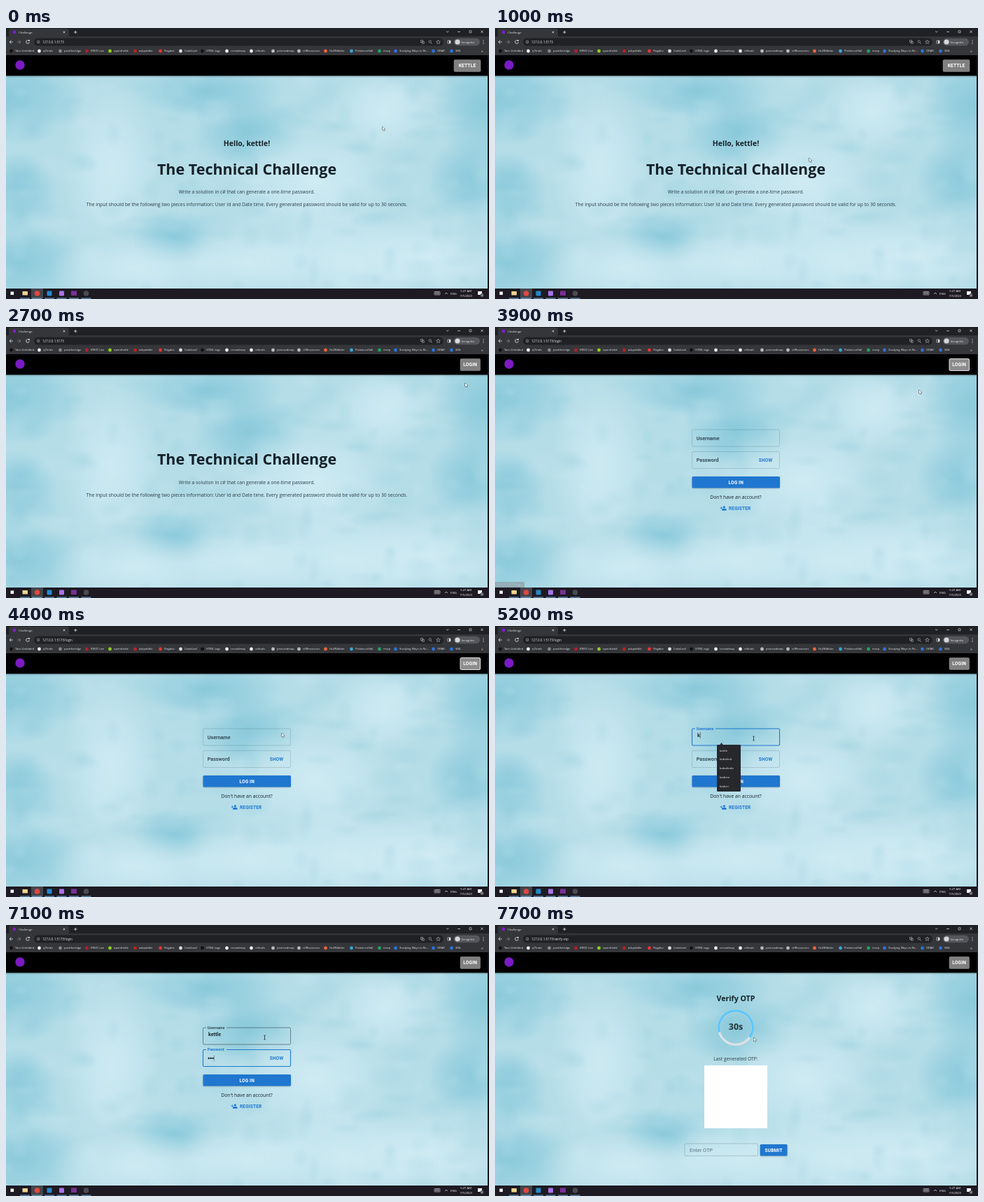
An HTML page with a canvas for the animation above (8 s loop, 690 by 388 pixels).

```html
<!DOCTYPE html>
<html lang="en">
<head>
<meta charset="utf-8">
<title>Challenge</title>
<style>
html, body { margin: 0; width: 100%; height: 100%; overflow: hidden; background: #000; }
canvas { display: block; width: 690px; height: 388px; }
</style>
</head>
<body>
<canvas id="stage" width="690" height="388"></canvas>
<script>
const W = 690, H = 388, LOOP = 8000, USER = 'kettle';
const BLUE = '#1f77cf', INK = '#15222a', SANS = '"Open Sans", sans-serif', ROBOTO = 'Roboto, sans-serif';
const g = document.getElementById('stage').getContext('2d');
let c = g;

const clamp = v => Math.max(0, Math.min(1, v));
const mix = (a, b, p) => a + (b - a) * p;
const ease = p => p * p * (3 - 2 * p);

function rect(x, y, w, h, fill, r = 0) {
  c.fillStyle = fill;
  c.beginPath();
  c.roundRect(x, y, w, h, r);
  c.fill();
}
function frame(x, y, w, h, color, r = 0, width = 0.6) {
  c.strokeStyle = color;
  c.lineWidth = width;
  c.beginPath();
  c.roundRect(x, y, w, h, r);
  c.stroke();
}
function dot(x, y, r, fill) {
  c.fillStyle = fill;
  c.beginPath();
  c.arc(x, y, r, 0, 7);
  c.fill();
}
function line(color, width, ...pts) {
  c.strokeStyle = color;
  c.lineWidth = width;
  c.beginPath();
  for (let i = 0; i < pts.length; i += 2) c.lineTo(pts[i], pts[i + 1]);
  c.stroke();
}
// y is the middle of the capital letters
function text(s, x, y, size, color = INK, weight = 400, align = 'left', family = SANS, spacing = 0) {
  c.font = `${weight} ${size}px ${family}`;
  c.letterSpacing = spacing + 'px';
  c.textAlign = align;
  c.fillStyle = color;
  c.fillText(s, x, y + size * 0.357);
  c.letterSpacing = '0px';
}
const centred = (s, y, size, weight, color) => text(s, 344, y, size, color, weight, 'center');
const caps = (s, x, y, color = '#fff', size = 6.5, align = 'center') =>
  text(s, x, y, size, color, 700, align, ROBOTO, 0.18);

function layer(draw) {
  const canvas = document.createElement('canvas');
  canvas.width = W;
  canvas.height = H;
  c = canvas.getContext('2d');
  draw();
  c = g;
  return canvas;
}

function blob(x, y, rx, ry, rgb, alpha) {
  c.save();
  c.translate(x, y);
  c.scale(rx, ry);
  const fill = c.createRadialGradient(0, 0, 0, 0, 0, 1);
  fill.addColorStop(0, `rgba(${rgb},${alpha})`);
  fill.addColorStop(0.5, `rgba(${rgb},${alpha * 0.6})`);
  fill.addColorStop(1, `rgba(${rgb},0)`);
  c.fillStyle = fill;
  c.fillRect(-1, -1, 2, 2);
  c.restore();
}

function drawSky() {
  const deep = '122,194,213', pale = '214,238,245';
  rect(0, 68, W, 305, '#b5dde8');
  for (const [x, y, rx, ry] of [[5, 100, 110, 70], [290, 90, 110, 40], [685, 110, 75, 85], [20, 335, 95, 60],
    [15, 235, 60, 60], [665, 215, 65, 60], [345, 150, 80, 55], [240, 300, 60, 40]])
    blob(x, y, rx, ry, deep, 0.7);
  for (const [x, y, rx, ry] of [[150, 200, 70, 120], [190, 345, 130, 50], [480, 330, 140, 70], [600, 330, 110, 65],
    [440, 220, 120, 80], [345, 335, 100, 55], [540, 120, 80, 60]])
    blob(x, y, rx, ry, pale, 0.75);
  let seed = 7;
  const rnd = () => (seed = seed * 16807 % 2147483647) / 2147483647;
  for (let i = 0; i < 220; i++)
    blob(rnd() * W, 68 + rnd() * 305, 10 + rnd() * 24, 7 + rnd() * 18, rnd() < 0.45 ? deep : pale, 0.13);
}

const bookmarks = [
  [7, 'Tarn Unfolded', '#111'], [47, 'q7trials', '#eee'], [77, 'pasttheridge', '#888'], [115, 'KRVD Live', '#b3202b'],
  [148, 'openthelid', '#8bd41f'], [184, 'askpebble', '#b22'], [220, 'Flagdex', '#e33'], [249, 'CodeLeaf', '#ddd'],
  [280, 'HTML tags', '#111'], [315, 'crroadmap', '#eee'], [350, 'ctftools', '#eee'], [381, 'penroadmap', '#bbb'],
  [418, 'ctfResources', '#bbb'], [456, 'HullNibbler', '#f0643c'], [493, 'ProberunHall', '#36a6d8'],
  [533, 'mvcp', '#1fa463'], [556, 'Studying Ways to Re...', '#2a73d9'], [610, 'ORAR', '#2a73d9'], [636, 'SML', '#2a73d9']
];

function drawBrowser() {
  const bar = '#35363a', light = '#e2e4e7';
  rect(0, 0, W, 39, bar);
  rect(0, 0, W, 12, '#202124');
  rect(4, 1, 86, 13, bar, 3);
  dot(12, 6, 2.4, '#7b1fc9');
  text('Challenge', 18, 6, 4.3, light);
  const cross = (x, y, r) => {
    line(light, 0.7, x - r, y - r, x + r, y + r);
    line(light, 0.7, x + r, y - r, x - r, y + r);
  };
  cross(83, 6, 1.4);
  line(light, 0.8, 97, 6, 101.5, 6);
  line(light, 0.8, 99.25, 3.8, 99.25, 8.2);
  line(light, 0.7, 629, 4.5, 630.7, 6, 632.4, 4.5);
  line(light, 0.7, 645, 5.5, 649, 5.5);
  frame(662, 3.8, 3, 3, light);
  cross(680, 5.3, 1.7);

  line(light, 0.8, 7.5, 17.5, 5, 20, 7.5, 22.5);
  line(light, 0.8, 5, 20, 10, 20);
  line('#85878b', 0.8, 18.5, 17.5, 21, 20, 18.5, 22.5);
  line('#85878b', 0.8, 16, 20, 21, 20);
  c.beginPath();
  c.arc(31, 20, 2.3, 0, 5.2);
  c.strokeStyle = light;
  c.stroke();
  rect(32, 17, 1.8, 1.8, light);
  rect(40, 14.5, 585, 11, '#202124', 5.5);
  frame(44.5, 18, 3.4, 3.8, '#bbb', 1.7);
  line('#bbb', 0.6, 46.2, 19.5, 46.2, 21);
  frame(592.5, 17.5, 3, 3, '#bbb');
  frame(594.3, 19.3, 3, 3, '#bbb');
  frame(604, 17.7, 3.4, 3.4, '#bbb', 1.7);
  line('#bbb', 0.7, 607, 21, 608.7, 22.7);
  line('#bbb', 0.6, 617.5, 17, 618.3, 19, 620.4, 19.2, 618.8, 20.5, 619.3, 22.6, 617.5, 21.5,
    615.7, 22.6, 616.2, 20.5, 614.6, 19.2, 616.7, 19, 617.5, 17);
  frame(631, 18, 4, 4, light);
  rect(633, 18, 2, 4, light);
  rect(640, 14.7, 37, 10.6, '#55575c', 5.3);
  dot(645, 20, 3.6, '#d5d7da');
  text('Incognito', 650.5, 20, 4.3, light);
  for (const y of [17.8, 20, 22.2]) dot(682, y, 0.6, light);
  for (const [x, name, color] of bookmarks) {
    dot(x + 0.5, 33, 2.4, color);
    text(name, x + 6, 33, 4.1, light);
  }
  text('»', 679, 33, 5.5, light);

  rect(0, 39, W, 29, '#000');
  dot(20, 53, 6.7, '#7a1bc4');
  rect(0, 68, W, 1, 'rgba(0,0,0,.55)');
  rect(0, 69, W, 1.5, 'rgba(0,0,0,.12)');
  rect(688, 39, 2, 334, '#15181b');
}

function drawTaskbar() {
  rect(0, 373, W, 15, '#1d1a23');
  rect(6.5, 377.5, 4.6, 4.6, '#fff');
  rect(36, 373, 17, 15, '#44454c');
  rect(23.5, 377, 7.5, 5.6, '#f2d68a', 0.6);
  dot(44.5, 380, 3.8, '#e0483c');
  rect(58.5, 376.5, 7, 7, '#2489ca', 1);
  rect(76, 376.5, 7, 7, '#a974e8', 1);
  rect(93, 376.5, 8, 6.6, '#7a2f94', 0.6);
  dot(114.5, 380, 3.8, '#4a4b50');
  for (const x of [20, 37, 55, 72.5, 90, 107.5]) rect(x, 386.6, 14, 1, '#79b8e8');
  frame(612, 377.5, 8, 4.5, '#ddd', 0.5);
  for (const y of [378.9, 380.3]) line('#ddd', 0.7, 613, y, 619, y);
  line('#eee', 0.7, 627, 381, 629, 379, 631, 381);
  text('ENG', 635, 380, 4.3, '#fff');
  text('5:27 AM', 665, 376.7, 4.2, '#fff', 400, 'right');
  text('7/5/2023', 666, 383.8, 4.2, '#fff', 400, 'right');
  rect(674, 377, 6, 5, '#fff');
  dot(680, 382.5, 2.6, '#55585d');
  text('2', 680, 382.5, 3.6, '#fff', 400, 'center');
}

const backdrop = layer(() => { drawSky(); drawBrowser(); drawTaskbar(); });

function headerButton(label, x, w, active) {
  rect(x, 45.5, w, 17, active ? '#8d8d8d' : '#808080', 1.5);
  frame(x, 45.5, w, 17, active ? '#e4e4e4' : '#969696', 1.5, active ? 1 : 0.5);
  caps(label, x + w / 2, 54, '#fff', 6.6);
}

function blueButton(label, x, y, w, h) {
  c.shadowColor = 'rgba(0,0,0,.25)';
  c.shadowBlur = 2;
  c.shadowOffsetY = 0.7;
  rect(x, y, w, h, BLUE, 1.5);
  c.shadowColor = 'transparent';
  caps(label, x + w / 2, y + h / 2);
}

// lift: 0 = label resting inside, 1 = label set into the top border
function field(label, y, lift, color, width) {
  c.save();
  if (lift > 0) {
    c.beginPath();
    c.rect(0, 0, W, H);
    c.rect(286, y - 2, 29 * lift, 4);
    c.clip('evenodd');
  }
  frame(281.5, y, 125, 24, color, 1.5, width);
  c.restore();
  text(label, 287.7, mix(y + 12, y, lift), mix(7.2, 5.4, lift), color === BLUE ? BLUE : '#36505c', 700, 'left', ROBOTO);
}

function home(user, y) {
  if (user) centred(`Hello, ${user}!`, 165, 10.4, 700);
  centred('The Technical Challenge', y, 21.5, 700);
  centred('Write a solution in c# that can generate a one-time password.', y + 33, 6.8, 400, '#2a3d45');
  centred('The input should be the following two pieces information: User Id and Date time. ' +
    'Every generated password should be valid for up to 30 seconds.', y + 51, 6.8, 400, '#2a3d45');
}

function suggestions(picked) {
  rect(317, 170, 34, 67, '#26282c', 1);
  c.beginPath();
  c.moveTo(321, 170.5);
  c.lineTo(323.5, 167);
  c.lineTo(326, 170.5);
  c.fill();
  if (picked) rect(317, 172, 34, 12, '#44474c');
  [USER, 'kobalind', 'kobalindo', 'kadoro', 'kadori'].forEach((name, i) =>
    text(name, 321, 178 + i * 12.9, 4.3, '#f1f1f1'));
}

const dotTimes = [6200, 6900, 7100, 7300, 7400];

function login(t) {
  const inName = t >= 4500 && t < 5800, inPass = t >= 5800;
  const plain = 'rgba(20,50,65,.28)';
  field('Username', 147, clamp((t - 4500) / 200), inName ? BLUE : inPass ? '#33454d' : plain, inName ? 1.1 : 0.6);
  field('Password', 178.5, clamp((t - 5800) / 220), inPass ? BLUE : plain, inPass ? 1.1 : 0.6);
  caps('SHOW', 386.5, 190.5, BLUE);
  const typed = t < 4900 ? '' : t < 5400 ? USER[0] : USER;
  text(typed, 289, 156.8, 7.1, '#1b2a31', 700, 'left', ROBOTO);
  if (inName) {
    const x = 289.5 + c.measureText(typed).width;
    line('#333', 0.6, x, 152, x, 161);
  }
  if (inPass) {
    const count = dotTimes.filter(at => t >= at).length;
    for (let i = 0; i < count; i++) dot(289.7 + i * 3, 190.8, 1.2, INK);
    const x = 288.3 + count * 3;
    line('#4a6b7c', 0.6, x, 186.5, x, 195);
  }
  blueButton('LOG IN', 281.5, 214, 125.5, 16.5);
  centred("Don't have an account?", 243.5, 6.8, 400);
  dot(327.3, 257.8, 1.6, BLUE);
  rect(324, 260, 6.6, 2.8, BLUE, [1.6, 1.6, 0, 0]);
  line(BLUE, 0.8, 321.6, 259, 325, 259);
  line(BLUE, 0.8, 323.3, 257.3, 323.3, 260.7);
  caps('REGISTER', 334, 259.7, BLUE, 6.5, 'left');
  if (t >= 4950 && t < 5600) suggestions(t >= 5400);
}

function verify() {
  centred('Verify OTP', 105.6, 10.6, 700);
  const arc = (from, to, color) => {
    c.strokeStyle = color;
    c.lineWidth = 3;
    c.beginPath();
    c.arc(344, 147, 24.3, from, to);
    c.stroke();
  };
  arc(0, 7, '#dfe3e6');
  arc(2.88, 6.89, '#5bc6fa');
  centred('30s', 145.7, 12.4, 700, '#22333b');
  centred('Last generated OTP:', 191.3, 6.8, 400, '#2a3d45');
  rect(299, 201, 90, 90, '#fff');
  frame(271, 313, 104.5, 17.5, 'rgba(20,50,65,.35)', 1.5);
  text('Enter OTP', 278, 322, 7.4, '#5c747e', 400, 'left', ROBOTO);
  blueButton('SUBMIT', 378.7, 314, 38.8, 16.5);
}

const path = [
  [0, 538, 141], [400, 440, 232], [700, 356, 243], [900, 366, 225], [1100, 532, 147], [1300, 532, 147],
  [1700, 648, 58], [1900, 651, 57], [2200, 657, 78], [2700, 656, 80], [3000, 662, 56], [3400, 662, 56],
  [3900, 606, 90], [4000, 606, 90], [4500, 369.5, 161]
];
function pointerAt(t) {
  const i = path.findIndex(p => p[0] > t);
  if (i < 0) return path[path.length - 1].slice(1);
  const [t0, x0, y0] = path[i - 1], [t1, x1, y1] = path[i];
  const p = ease((t - t0) / (t1 - t0));
  return [mix(x0, x1, p), mix(y0, y1, p)];
}

function pointer(t) {
  const [x, y] = pointerAt(t);
  c.save();
  c.translate(x, y);
  if (t >= 4500 && t < 7600) {
    line('#1b2a31', 0.8, 0, -2.8, 0, 2.8);
    for (const e of [-2.9, 2.9]) line('#1b2a31', 0.7, -1.3, e, 1.3, e);
  } else if ((t >= 1700 && t < 2300) || (t >= 3000 && t < 3500)) {
    frame(-0.7, 0, 1.5, 4, '#222', 0.7);
    frame(-1.6, 2.4, 4.6, 3.6, '#222', 1);
    rect(-0.7, 0, 1.5, 4, '#fff', 0.7);
    rect(-1.6, 2.4, 4.6, 3.6, '#fff', 1);
  } else {
    c.beginPath();
    for (const [px, py] of [[0, 0], [0, 5.2], [1.2, 4.2], [2.1, 6.1], [3, 5.7], [2.1, 3.8], [3.7, 3.8]]) c.lineTo(px, py);
    c.closePath();
    c.strokeStyle = '#222';
    c.lineWidth = 0.9;
    c.stroke();
    c.fillStyle = '#fff';
    c.fill();
  }
  c.restore();
}

function draw(t) {
  c.drawImage(backdrop, 0, 0);
  const route = t < 3300 ? '' : t < 7600 ? '/login' : '/verify-otp';
  text('127.0.0.1:5173' + route, 52, 20, 4.55, '#e8eaed');
  if (t < 2300) {
    headerButton(USER.toUpperCase(), 640, 38, t >= 1700);
    home(USER, 202);
    if (t >= 1800) {
      rect(636.5, 65.5, 44, 23.5, '#808080');
      frame(636.5, 65.5, 44, 23.5, '#202020', 0, 1.2);
      caps('LOGOUT', 658.5, 77, '#fff', 6.9);
    }
  } else {
    headerButton('LOGIN', 649, 28.5, t >= 3000 && t < 4500);
    if (t < 3300) home('', 189.5);
    else if (t < 7600) login(t);
    else verify();
  }
  if (t >= 3000 && t < 4000) {
    c.globalAlpha = t < 3800 ? 1 : 0.8;
    rect(0, 365, 42, 8, '#8fa3aa', [0, 1.5, 0, 0]);
    text('127.0.0.1:5173/login', 2, 369, 3.9, '#c3ced2');
    c.globalAlpha = 1;
  }
  pointer(t);
}

function tick() {
  draw(Math.floor(performance.now() % LOOP / 100) * 100);
  requestAnimationFrame(tick);
}
tick();
</script>
</body>
</html>
```
